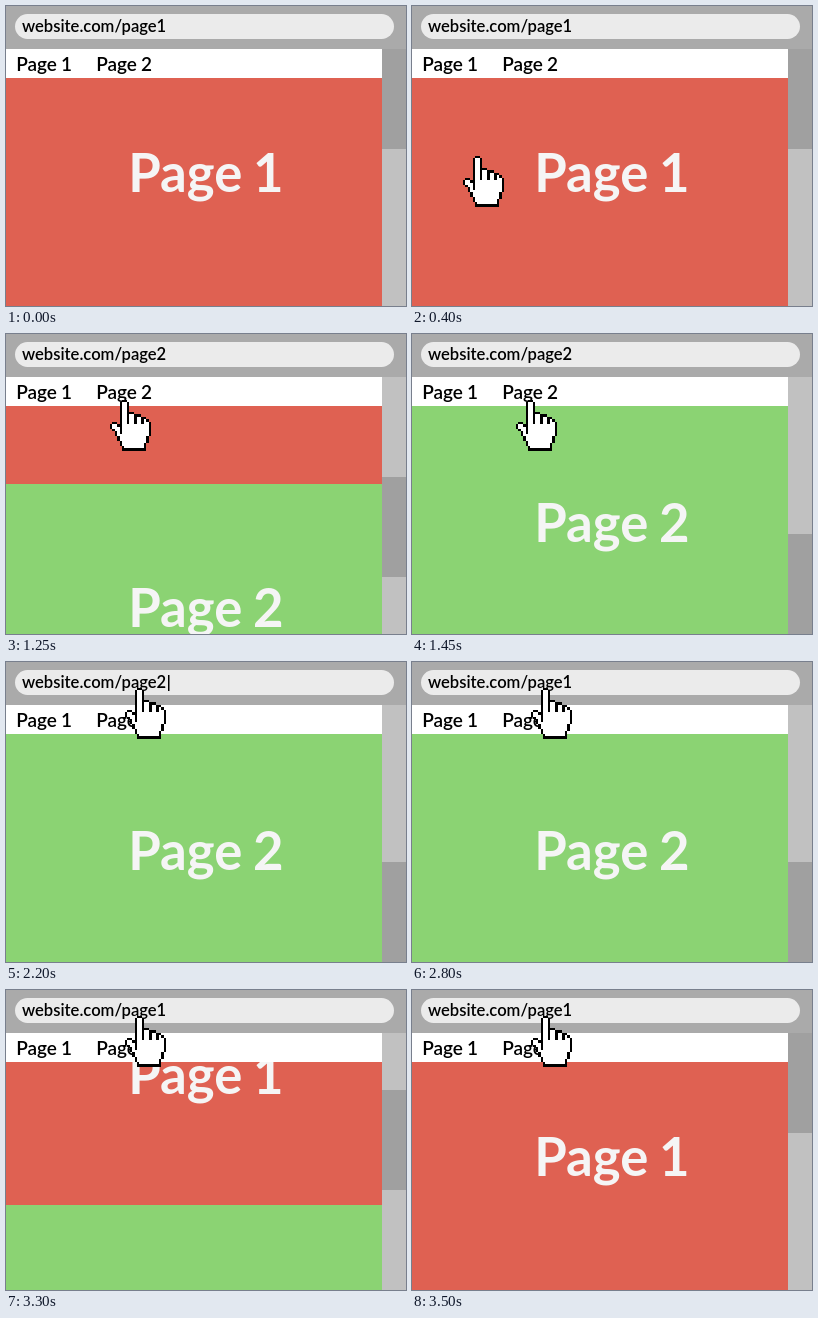
These frames come from a looping animation (400x300 px, 7.5 s). An HTML page:

```html
<!DOCTYPE html>
<html lang="en">
<head>
<meta charset="utf-8">
<title>Page navigation</title>
<style>
  html, body { margin: 0; width: 100%; height: 100%; overflow: hidden; }
  svg { display: block; width: 400px; height: 300px; }
  text { font-family: Lato, "Open Sans", sans-serif; white-space: pre; word-spacing: -.04em; }
  .title { font-size: 52.7px; font-weight: 700; fill: #f5f5f5; }
  .link { font-size: 19px; font-weight: 600; }
  #url { font-size: 16.6px; font-weight: 600; }
</style>
</head>
<body>
<svg viewBox="0 0 400 300">
  <rect width="400" height="300" fill="#df6152"/>
  <text class="title" x="122.3" y="186" id="title1">Page 1</text>
  <g id="page2">
    <rect y="300" width="400" height="300" fill="#8bd373"/>
    <text class="title" x="122.3" y="443">Page 2</text>
  </g>

  <rect y="43" width="376" height="29" fill="#fff"/>
  <text class="link" x="10.2" y="65">Page 1</text>
  <text class="link" x="90.2" y="65" id="link2">Page 2</text>

  <rect x="376" y="43" width="24" height="257" fill="#c1c1c1"/>
  <rect x="376" y="43" width="24" height="100" fill="#a0a0a0" id="thumb"/>

  <rect width="400" height="43" fill="#aaa"/>
  <rect x="9" y="8" width="379" height="25" rx="12.5" fill="#ebebeb"/>
  <rect x="14" y="13" width="148" height="16" fill="#5aa5f5" id="selection"/>
  <text id="url" x="16" y="26"></text>
  <rect y="13" width="1.5" height="16" id="caret"/>

  <g id="hand">
    <g transform="scale(2.41)" shape-rendering="crispEdges">
      <path d="M5 0h2v1h1v4h2v1h3v1h2v1h1v1h1v6h-1v3h-1v3H5v-2H4v-2H3v-2H2v-2H1v-1H0v-2h1v-1h2v1h1V1h1z"/>
      <path fill="#fff" d="M5 1h2v9h1V6h2v4h1V7h2v3h1V8h1v1h1v6h-1v3h-1v2H6v-1H5v-2H4v-2H3v-2H2v-1H1v-2h2v1h1v3h1z"/>
    </g>
  </g>
</svg>
<script>
const LOOP = 7500, STEP = 50;
const el = id => document.getElementById(id);
const title1 = el('title1'), page2 = el('page2'), link2 = el('link2'), thumb = el('thumb'),
      selection = el('selection'), url = el('url'), caret = el('caret'), hand = el('hand');

const handStops = { outside: [-42, 297], link: [104, 66], address: [119, 26] };
const between = (t, from, to) => t >= from && t < to;
const show = (node, on) => node.setAttribute('visibility', on ? 'visible' : 'hidden');
const place = (node, x, y) => node.setAttribute('transform', `translate(${x} ${y})`);
const lerp = (a, b, k) => Math.round(a + (b - a) * k);

// Linear progress held on each 50 ms tick; the first step lands at `start`.
function stepped(t, start, count) {
  const done = Math.floor((t - start) / STEP) + 1;
  return Math.min(Math.max(done, 0), count) / count;
}

function handPosition(t) {
  const { outside, link, address } = handStops;
  const [from, to, k] = t < 1500
    ? [outside, link, stepped(t, 100, 11)]
    : [link, address, stepped(t, 1500, 6)];
  return from.map((v, i) => lerp(v, to[i], k));
}

function pageInAddress(t) {
  if (between(t, 900, 2400)) return 'page2';
  return between(t, 2400, 2600) ? 'page' : 'page1';
}

function draw(t) {
  const scroll = stepped(t, 950, 11) - stepped(t, 3000, 11);
  place(title1, 0, lerp(0, -225, scroll));
  place(page2, 0, lerp(0, -235, scroll));
  thumb.setAttribute('y', lerp(43, 200, scroll));

  link2.setAttribute('fill', between(t, 700, 900) ? '#3b7dd8' : '#000');

  url.textContent = 'website.com/' + pageInAddress(t);
  show(selection, between(t, 1800, 2200));
  show(caret, between(t, 2200, 2800));
  caret.setAttribute('x', between(t, 2400, 2600) ? 152 : 162);

  show(hand, t >= 100);
  place(hand, ...handPosition(t));
}

const begin = performance.now();
function tick() {
  draw((performance.now() - begin) % LOOP);
  requestAnimationFrame(tick);
}
tick();
</script>
</body>
</html>
```
